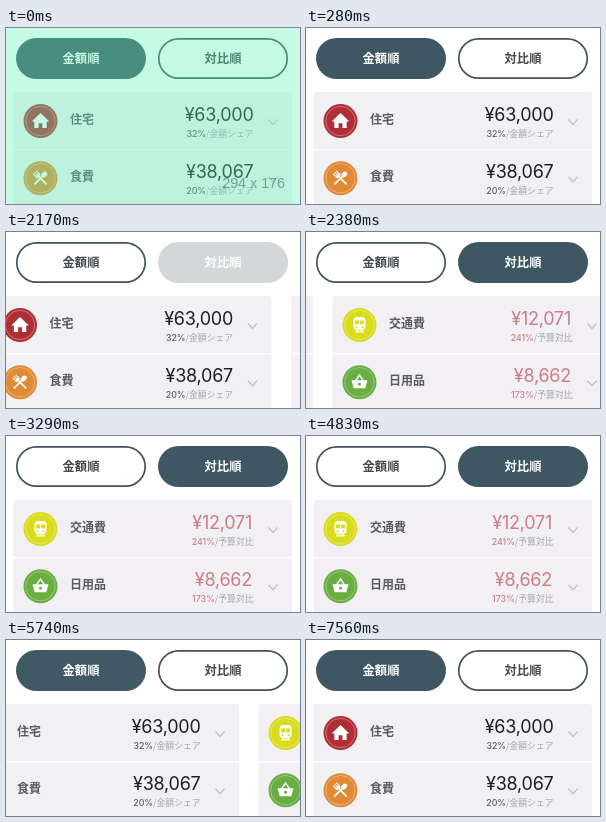
Write an HTML page with a canvas that moves like this. It is 294x176 px and loops after 7.63 s.

```html
<!DOCTYPE html>
<html lang="ja">
<head>
<meta charset="utf-8">
<style>
html, body { margin: 0; width: 100%; height: 100%; overflow: hidden; background: #fff; }
canvas { display: block; width: 294px; height: 176px; }
</style>
</head>
<body>
<canvas id="stage"></canvas>
<script>
const W = 294, H = 176, LOOP = 7630, PITCH = 298;
const TAPS = [1924, 5320];
const PRESS = 210, SLIDE_DELAY = 194, SLIDE = 314;
const DARK = '#3e5762', OUTLINE = '#42525b';
const JP = '"Noto Sans CJK JP", "Noto Sans CJK", sans-serif';
const LATIN = 'Inter, sans-serif';

const canvas = document.getElementById('stage');
const c = canvas.getContext('2d');
const dpr = window.devicePixelRatio || 1;
canvas.width = W * dpr;
canvas.height = H * dpr;

const clamp = v => Math.max(0, Math.min(1, v));
const ease = v => (1 - Math.cos(Math.PI * clamp(v))) / 2;

function text(s, x, y, font, color, align = 'left', spacing = 0) {
  c.font = font;
  c.letterSpacing = spacing + 'px';
  c.fillStyle = color;
  c.textAlign = align;
  c.fillText(s, x, y);
  const w = c.measureText(s).width;
  c.letterSpacing = '0px';
  return w;
}

function roundRect(x, y, w, h, r) {
  c.beginPath();
  c.roundRect(x, y, w, h, r);
}

function poly(points) {
  c.beginPath();
  points.forEach(([x, y]) => c.lineTo(x, y));
  c.closePath();
}

function disc(r) {
  c.beginPath();
  c.arc(0, 0, r, 0, Math.PI * 2);
}

const icons = {
  house() {
    poly([[0, -9], [10, 0.5], [7, 0.5], [7, 8], [2.2, 8], [2.2, 2.5], [-2.2, 2.5], [-2.2, 8], [-7, 8], [-7, 0.5], [-10, 0.5]]);
    c.fill();
  },
  cutlery() {
    c.lineWidth = 2;
    c.lineCap = 'round';
    c.save();
    c.rotate(Math.PI / 4);
    c.beginPath();
    c.ellipse(0, -6, 2.7, 3.8, 0, 0, Math.PI * 2);
    c.fill();
    c.beginPath();
    c.moveTo(0, -3);
    c.lineTo(0, 9);
    c.stroke();
    c.restore();
    c.save();
    c.rotate(-Math.PI / 4);
    c.beginPath();
    c.moveTo(0, -3);
    c.lineTo(0, 9);
    c.stroke();
    c.lineWidth = 1.3;
    c.beginPath();
    for (const x of [-2.4, 0, 2.4]) {
      c.moveTo(x, -9);
      c.lineTo(x, -4);
    }
    c.stroke();
    c.fillRect(-3, -5.3, 6, 2.6);
    c.restore();
    c.lineCap = 'butt';
  },
  train(color) {
    roundRect(-6.8, -9, 13.6, 14.5, 4);
    c.fill();
    poly([[-3.5, 5], [3.5, 5], [5.5, 8.5], [-5.5, 8.5]]);
    c.fill();
    c.fillStyle = color;
    c.fillRect(-5, -5.2, 4.3, 4.5);
    c.fillRect(0.7, -5.2, 4.3, 4.5);
    for (const x of [-3.5, 3.5]) {
      c.beginPath();
      c.arc(x, 2.6, 1.2, 0, Math.PI * 2);
      c.fill();
    }
    c.fillRect(-3, 6.2, 6, 0.9);
  },
  basket(color) {
    c.lineWidth = 1.7;
    c.beginPath();
    c.moveTo(-5, -1);
    c.lineTo(0, -8);
    c.lineTo(5, -1);
    c.stroke();
    poly([[-9, -2.2], [9, -2.2], [6.6, 7], [-6.6, 7]]);
    c.fill();
    c.fillStyle = color;
    c.beginPath();
    c.arc(0, 2.2, 1.7, 0, Math.PI * 2);
    c.fill();
  }
};

const pages = [
  {
    bg: '#f1f0f3', ink: '#1f1f22', share: '#5a5a5e', unit: '/金額シェア', right: 247.5,
    rows: [
      { label: '住宅', amount: '¥63,000', pct: '32%', icon: 'house', color: '#b02f37' },
      { label: '食費', amount: '¥38,067', pct: '20%', icon: 'cutlery', color: '#e08a36' }
    ]
  },
  {
    bg: '#f3f0f5', ink: '#cb7d85', share: '#cb7d85', unit: '/予算対比', right: 246,
    rows: [
      { label: '交通費', amount: '¥12,071', pct: '241%', icon: 'train', color: '#d8dc1c' },
      { label: '日用品', amount: '¥8,662', pct: '173%', icon: 'basket', color: '#69ae42' }
    ]
  }
];

function badge(x, y, row) {
  c.save();
  c.translate(x, y);
  c.fillStyle = row.color;
  disc(17);
  c.fill();
  c.strokeStyle = 'rgba(255,255,255,.32)';
  c.lineWidth = 1;
  disc(14.7);
  c.stroke();
  c.scale(0.88, 0.88);
  c.fillStyle = c.strokeStyle = '#fff';
  icons[row.icon](row.color);
  c.restore();
}

function drawRow(page, row, y) {
  badge(34.5, y + 29, row);
  text(row.label, 64, y + 32, `700 12px ${JP}`, '#5a5a5f');
  text(row.amount, page.right, y + 28.5, `400 18px ${LATIN}`, page.ink, 'right', -0.25);
  const unitW = text(page.unit, 247.5, y + 45, `400 8.8px ${JP}`, '#a3a3a8', 'right');
  text(row.pct, 247.5 - unitW, y + 45, `500 8.8px ${LATIN}`, page.share, 'right');
  c.strokeStyle = '#c0c0c5';
  c.lineWidth = 1.3;
  c.beginPath();
  c.moveTo(262.5, y + 27.5);
  c.lineTo(267, y + 32.5);
  c.lineTo(271.5, y + 27.5);
  c.stroke();
}

function drawPage(page, x) {
  if (x <= -W || x >= W) return;
  c.save();
  c.translate(x, 0);
  c.fillStyle = page.bg;
  roundRect(7.5, 64, 278.5, 57, [3, 3, 0, 0]);
  c.fill();
  c.fillRect(7.5, 122.3, 278.5, 54);
  page.rows.forEach((row, i) => drawRow(page, row, 64 + i * 57.2));
  c.restore();
}

function drawButton(x, label, on, alpha) {
  c.save();
  c.globalAlpha = alpha;
  if (on) {
    c.fillStyle = DARK;
    roundRect(x, 10, 130, 41, 20.5);
    c.fill();
    c.globalAlpha = 1;
  } else {
    c.strokeStyle = OUTLINE;
    c.lineWidth = 1.7;
    roundRect(x + 0.8, 10.8, 128.4, 39.4, 19.7);
    c.stroke();
  }
  text(label, x + 65, 34.8, `700 12.3px ${JP}`, on ? '#fff' : '#42484c', 'center');
  c.restore();
}

// A pressed button dims, switches state, then brightens again.
function pressAlpha(t) {
  if (t < 0) return 1;
  if (t < PRESS) return 1 - 0.82 * ease(t / 140);
  return 0.18 + 0.82 * ease((t - PRESS) / 230);
}

function drawOverlay(t) {
  const k = 1 - t / 280;
  if (k <= 0) return;
  c.save();
  c.globalAlpha = k;
  c.fillStyle = 'rgba(90,242,180,.35)';
  c.fillRect(0, 0, W, H);
  text('294 x 176', 279, 160, '14.3px "Liberation Sans", sans-serif', 'rgba(95,130,120,.75)', 'right');
  c.restore();
}

function draw(t) {
  const [a, b] = TAPS.map(tap => t - tap);
  const slide = ease((a - SLIDE_DELAY) / SLIDE) - ease((b - SLIDE_DELAY) / SLIDE);
  const second = a >= PRESS && b < PRESS;
  c.setTransform(dpr, 0, 0, dpr, 0, 0);
  c.fillStyle = '#fff';
  c.fillRect(0, 0, W, H);
  drawButton(10, '金額順', !second, pressAlpha(b));
  drawButton(152, '対比順', second, pressAlpha(a));
  pages.forEach((page, i) => drawPage(page, PITCH * (i - slide)));
  drawOverlay(t);
}

const start = performance.now();
function tick() {
  draw((performance.now() - start) % LOOP);
  requestAnimationFrame(tick);
}
tick();
</script>
</body>
</html>
```
